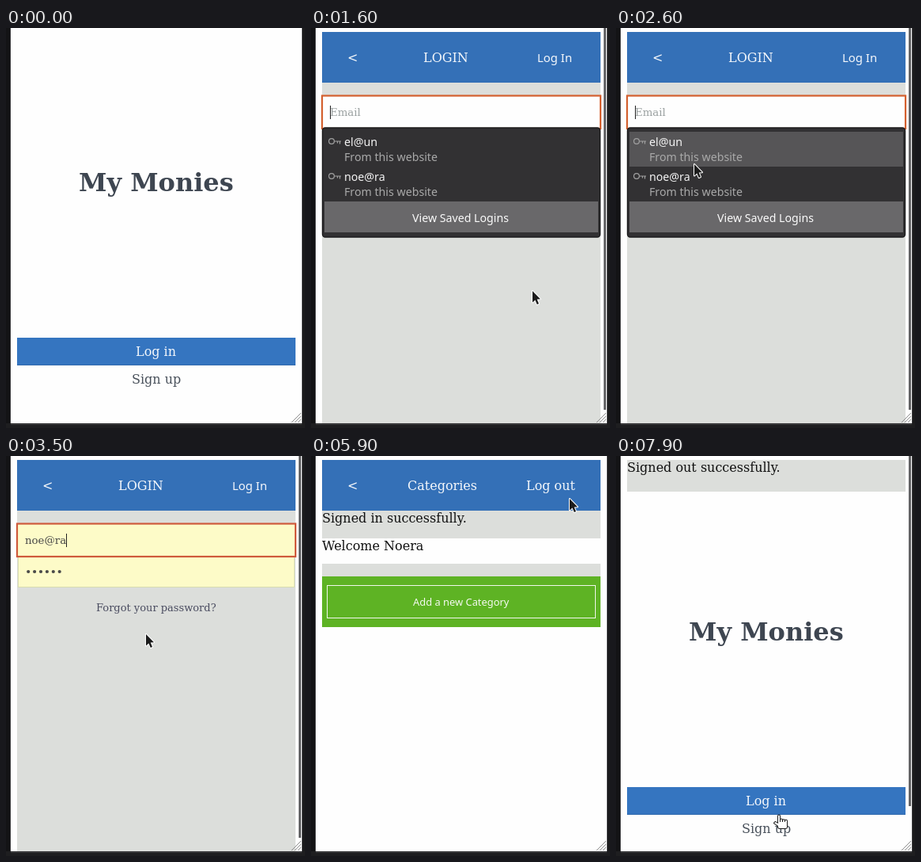
These frames come from a looping animation (378 by 505 pixels, 8 s). An HTML page with a canvas:

```html
<!DOCTYPE html>
<html lang="en">
<head>
<meta charset="utf-8">
<title>My Monies</title>
<style>
html, body { margin: 0; width: 100%; height: 100%; overflow: hidden; background: #fefefe; }
canvas { display: block; width: 378px; height: 505px; }
</style>
</head>
<body>
<canvas id="stage"></canvas>
<script>
const W = 378, H = 505, LOOP = 8000, STEP = 100;
const LEFT = 14, WIDE = 352, MID = LEFT + WIDE / 2;
const SERIF = '"DejaVu Serif", serif';
const SANS = '"Noto Sans", "Open Sans", sans-serif';
const BODY = '16px ' + SERIF, FIELD = '13.33px ' + SERIF, MENU = '14.2px ' + SANS;
const PAPER = '#fefefe', GREY = '#dcdedb', BLUE = '#3470b7', YELLOW = '#fdfbc8';
const INK = '#3e4651', PALE = '#f4f7fb', BLACK = '#111';

// Moments when the app changes state.
const LOGIN = 1500, FILLED = 3000, BLURRED = 4300, SIGNED_IN = 4800, SIGNED_OUT = 6600;

const canvas = document.getElementById('stage');
const ctx = canvas.getContext('2d');
const ratio = window.devicePixelRatio || 1;
canvas.width = W * ratio;
canvas.height = H * ratio;

// The pointer glides to each stop, arriving at `at` after `dur` ms.
const stop = (at, dur, x, y) => ({ at, dur, x, y });
const stops = [
  stop(700, 0, 342, 438), stop(900, 200, 214, 411),
  stop(1600, 0, 279, 331), stop(1900, 300, 228, 229),
  stop(2600, 600, 98, 171), stop(2900, 300, 93, 194),
  stop(3300, 400, 150, 270), stop(3500, 100, 176, 224), stop(4300, 800, 308, 33),
  stop(5900, 0, 326, 53), stop(6100, 200, 309, 33),
  stop(7100, 400, 307, 291), stop(7500, 200, 313, 372), stop(7900, 300, 206, 453)
];
const shown = [[700, 1200], [1600, 4600], [5900, 6300], [6800, LOOP]];

function pointerAt(t) {
  if (!shown.some(([from, to]) => t >= from && t < to)) return null;
  const i = stops.findIndex(s => s.at >= t);
  const b = stops[i], a = stops[i - 1] || b;
  const p = b.dur ? Math.max(0, 1 - (b.at - t) / b.dur) : t < b.at ? 0 : 1;
  const ease = p * p * (3 - 2 * p);
  const bow = 0.1 * Math.sin(Math.PI * ease);
  const dx = b.x - a.x, dy = b.y - a.y;
  return {
    x: Math.round(a.x + dx * ease - dy * bow),
    y: Math.round(a.y + dy * ease + dx * bow)
  };
}

function box(x, y, w, h, color) {
  ctx.fillStyle = color;
  ctx.fillRect(x, y, w, h);
}

function frame(x, y, w, h, color, line) {
  ctx.strokeStyle = color;
  ctx.lineWidth = line;
  ctx.strokeRect(x, y, w, h);
}

function text(str, x, y, font, color) {
  ctx.font = font;
  ctx.fillStyle = color;
  ctx.fillText(str, x, y);
}

function centered(str, x, y, font, color) {
  ctx.font = font;
  text(str, Math.round(x - ctx.measureText(str).width / 2), y, font, color);
}

function outlined(path, fill, stroke) {
  ctx.lineJoin = 'round';
  ctx.lineWidth = 2;
  ctx.strokeStyle = stroke;
  ctx.stroke(path);
  ctx.fillStyle = fill;
  ctx.fill(path);
}

const arrow = new Path2D('M1 1V15.5L4.4 12.4L6.8 18L9 17L6.7 11.6L11 11.3Z');

const hand = new Path2D('M-1 14L-6 10.5L-4.5 9L-1 11Z');
hand.roundRect(-1, 9, 11, 8, 2);
for (let i = 0; i < 4; i++) hand.roundRect(-1 + 3 * i, i ? 5 + 0.6 * i : 0.5, 2, 10, 1);

function drawPointer({ x, y }, isHand) {
  ctx.save();
  ctx.translate(x, y);
  if (isHand) outlined(hand, '#fff', '#1a1a1a');
  else outlined(arrow, '#1c1c1c', '#fff');
  ctx.restore();
}

function header(title, action, font, gap) {
  box(LEFT, 5, WIDE, 64, BLUE);
  text('<', 46, 43, BODY, PALE);
  text(title, gap, 43, BODY, PALE);
  centered(action, action === 'Log out' ? 303 : 308, 43, font, PALE);
}

function landing(shift) {
  if (shift) {
    box(LEFT, 5, WIDE, 40, GREY);
    text('Signed out successfully.', LEFT, 20, BODY, BLACK);
  }
  ctx.save();
  ctx.translate(0, shift);
  centered('My Monies', MID, 206, 'bold 32px ' + SERIF, INK);
  box(LEFT, 391, WIDE, 35, '#3069ad');
  box(LEFT, 391, WIDE, 34, '#3575c0');
  centered('Log in', MID, 414, BODY, PALE);
  centered('Sign up', MID, 449, BODY, '#48505a');
  ctx.restore();
}

function keyIcon(x, y) {
  ctx.strokeStyle = '#a0a0a0';
  ctx.lineWidth = 1.2;
  ctx.stroke(new Path2D(`M${x + 7.5} ${y}h8.5m-1.5 0v3.5m-3 -3.5v2.5`));
  ctx.beginPath();
  ctx.arc(x + 4, y, 3.4, 0, 7);
  ctx.stroke();
}

function dropdown(pointer) {
  const panel = new Path2D();
  panel.roundRect(14.5, 126, 351, 138, 3.5);
  ctx.fillStyle = '#323133';
  ctx.fill(panel);
  ctx.strokeStyle = '#1d1d1e';
  ctx.lineWidth = 1.4;
  ctx.stroke(panel);
  ['el@un', 'noe@ra'].forEach((name, i) => {
    const y = 131 + 44 * i;
    if (pointer && pointer.y >= y && pointer.y < y + 44) box(17, y, 346, 44, '#565557');
    keyIcon(22, y + 12);
    text(name, 42, y + 18, MENU, '#f5f5f5');
    text('From this website', 42, y + 37, MENU, '#a9a9a9');
  });
  box(17, 219, 346, 39, '#69686a');
  centered('View Saved Logins', 189, 245, MENU, '#fafafa');
}

function login(t, pointer) {
  const filled = t >= FILLED, focused = t < BLURRED;
  const fill = filled ? YELLOW : PAPER, ink = '#4a4a48';
  box(LEFT, 5, WIDE, 494, GREY);
  header('LOGIN', 'Log In', '14.9px ' + SANS, 142);

  for (const y of [87, 127]) {
    box(15, y - 1, 350, 40, filled ? '#d9ddb0' : '#d0d2cf');
    box(16, y + 1, 348, 37, fill);
  }
  if (focused) {
    box(LEFT, 85, WIDE, 42, fill);
    frame(LEFT, 85.5, WIDE, 41.5, filled ? '#cf5a3c' : '#d4602f', 2.2);
  }
  text(filled ? 'noe@ra' : 'Email', 24, 111, FIELD, filled ? ink : '#9aa0a0');
  if (focused && (t - (filled ? FILLED : LOGIN)) % 1066 < 533) {
    const typed = filled ? ctx.measureText('noe@ra').width : 0;
    box(24 + Math.round(typed), 98, 1, 17, '#222');
  }
  if (!filled) return dropdown(pointer);

  ctx.fillStyle = ink;
  for (let i = 0; i < 6; i++) {
    ctx.beginPath();
    ctx.arc(28.2 + 7.9 * i, 146, 2.1, 0, 7);
    ctx.fill();
  }
  centered('Forgot your password?', MID, 196, '13px ' + SERIF, '#4a4c60');
}

function categories() {
  header('Categories', 'Log out', BODY, 122);
  box(LEFT, 69, WIDE, 35, GREY);
  text('Signed in successfully.', LEFT, 84, BODY, BLACK);
  text('Welcome Noera', LEFT, 119, BODY, BLACK);
  box(LEFT, 136, WIDE, 16, GREY);
  box(LEFT, 152, WIDE, 64, '#5eb324');
  frame(20.5, 163.5, 339, 41, '#f1f7ec', 1);
  centered('Add a new Category', MID, 189, '12.9px ' + SANS, '#f4f9f0');
}

function scrollbar(end, alpha = 1) {
  ctx.globalAlpha = alpha;
  box(370, 0, 3, end, '#646466');
  ctx.globalAlpha = 1;
}

function bezel() {
  box(0, 0, 6, H, '#131315');
  box(5, 0, 1, H, '#3a3a3c');
  box(374, 0, 4, H, '#1b1b1d');
  box(374, 0, 1, H, '#3a3a3c');
  box(0, 499, W, 6, '#1e1e20');
  box(6, 499, 368, 2, '#38383a');
  ctx.strokeStyle = '#8c8c8c';
  ctx.lineWidth = 1;
  for (const n of [12, 8, 4]) ctx.stroke(new Path2D(`M${373 - n} 498l${n} ${-n}`));
}

function draw(t) {
  const pointer = pointerAt(t);
  let isHand = false;
  ctx.setTransform(ratio, 0, 0, ratio, 0, 0);
  box(0, 0, W, H, PAPER);

  if (t < LOGIN) {
    landing(0);
    if (t >= 700 && t < 1200) scrollbar(468, t < 1100 ? 1 : 0.5);
    isHand = t >= 800;
  } else if (t < SIGNED_IN) {
    login(t, pointer);
    scrollbar(482);
  } else if (t < SIGNED_OUT) {
    categories();
    if (t < SIGNED_IN + STEP) scrollbar(482, 0.5);
    isHand = t > 5900;
  } else {
    landing(27);
    scrollbar(442);
    isHand = t >= 7800;
  }
  bezel();
  if (pointer) drawPointer(pointer, isHand);
}

const start = performance.now();
function tick() {
  const t = (performance.now() - start) % LOOP;
  draw(Math.floor(t / STEP) * STEP);
  requestAnimationFrame(tick);
}
tick();
</script>
</body>
</html>
```
